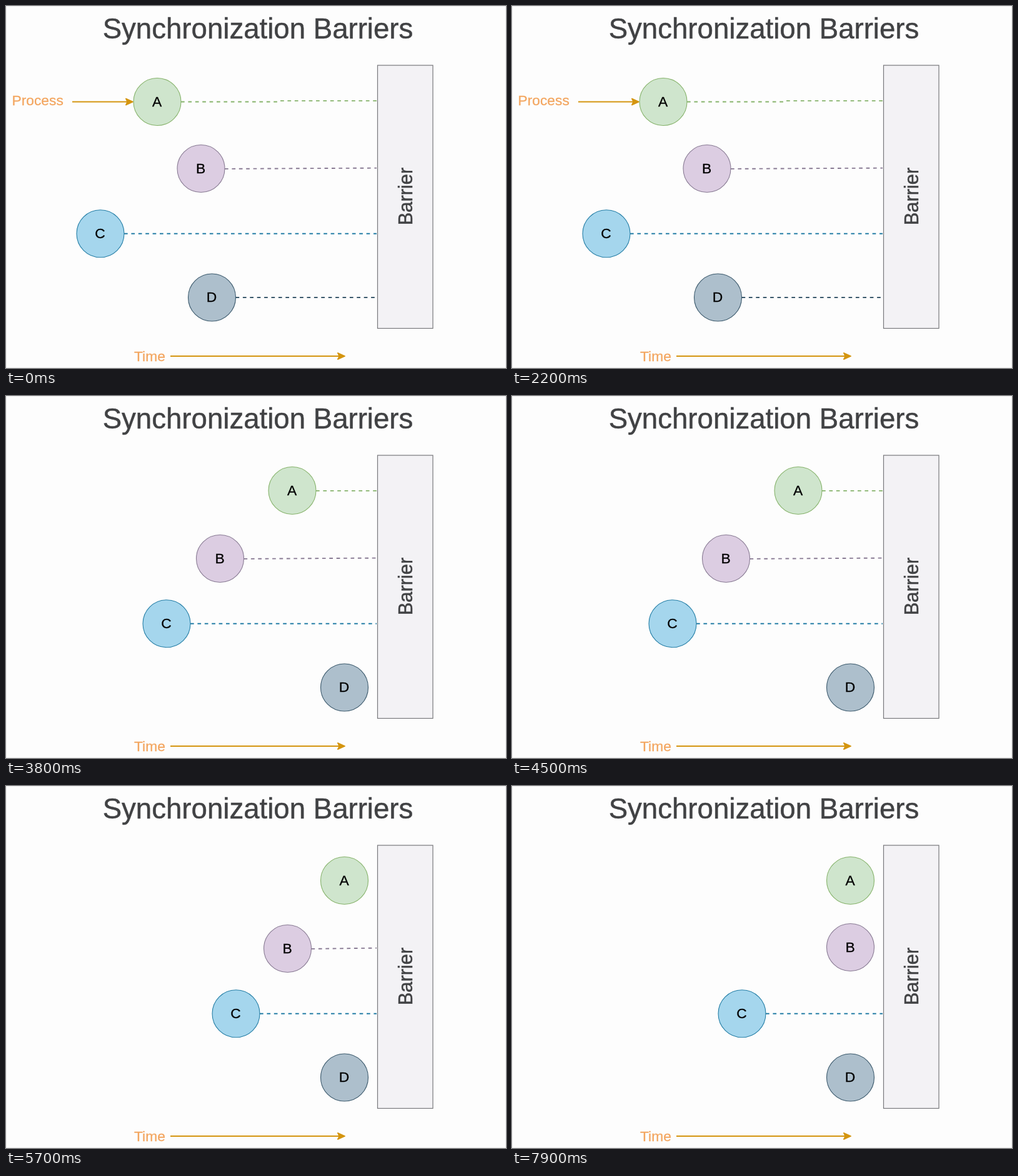
An HTML page for the animation above (8 s loop, 800 px wide and 580 px high).

```html
<!DOCTYPE html>
<html lang="en">
<head>
<meta charset="utf-8">
<title>Synchronization Barriers</title>
<style>
  html, body { margin: 0; width: 100%; height: 100%; overflow: hidden; background: #fdfdfd; }
  svg { display: block; width: 800px; height: 580px; font: 22.8px "Liberation Sans", Arial, sans-serif; }
  .mid { text-anchor: middle; }
  .dark { fill: #414244; stroke: #414244; stroke-width: .5; }
  .label { fill: #f3a660; stroke: #f3a660; stroke-width: .3; }
  .arrow { fill: #d4950f; stroke: #d4950f; stroke-width: 1.9; stroke-linejoin: round; }
  .dash { fill: none; stroke-width: 1.9; stroke-dasharray: 5.7; }
</style>
</head>
<body>
<svg viewBox="0 0 800 580">
  <rect x=".5" y=".5" width="799" height="579" fill="#fdfdfd" stroke="#efefef"/>
  <text class="mid dark" x="403" y="52" font-size="45.6">Synchronization Barriers</text>
  <g id="process">
    <text class="label" x="9.5" y="159">Process</text>
    <path class="arrow" d="M106 153.5H194M203 153.5l-11 -5l2.5 5l-2.5 5z"/>
  </g>
  <text class="label" x="205" y="569">Time</text>
  <path class="arrow" d="M263 561H534M542 561l-11 -5l2.5 5l-2.5 5z"/>
  <g id="nodes"></g>
  <rect x="594.5" y="95" width="88.5" height="421.5" fill="#f3f2f5" stroke="#77777b" stroke-width="1.2"/>
  <text class="mid dark" transform="translate(649.5 305) rotate(-90)" font-size="30.8">Barrier</text>
</svg>
<script>
const LOOP = 8000, R = 38, WALL = 593;
const STEPS = [0, 2300, 4600, 6900];

// x and y hold one position per step; at WAIT the node stands at the barrier
const WAIT = 541.5;
const nodes = [
  { name: 'A', fill: '#cfe5cd', line: '#86b36b', x: [242, 458, WAIT, WAIT], y: [153.5, 151.5, 151.5, 151.5] },
  { name: 'B', fill: '#dccde2', line: '#887a93', x: [312, 342.5, 450.5, WAIT], y: [260.5, 260.5, 260.5, 258.5] },
  { name: 'C', fill: '#a5d6ed', line: '#247ea6', x: [151, 257, 368, 368], y: [364.7, 364.7, 364.7, 364.7] },
  { name: 'D', fill: '#adbfcc', line: '#3a586b', x: [329.5, WAIT, WAIT, WAIT], y: [467, 467, 467, 467] }
];

// Dashed route from a node's right edge to the barrier
const routes = {
  A: (x, y) => `M${x} ${y}H434L436 151.9H${WALL}`,
  B: (x, y) => `M${x} ${y + .4}L${WALL} 259.6`,
  C: (x, y) => `M${x} ${y}H${WALL}`,
  D: (x, y) => `M${x} ${y}H590`
};

function drawNode({ name, fill, line, x, y }, step) {
  const cx = x[step], cy = y[step], start = cx + R;
  const path = name === 'A' && step ? `M${start} ${cy + .4}H${WALL}` : routes[name](start, cy);
  const route = cx === WAIT ? '' : `<path class="dash" stroke="${line}" d="${path}"/>`;
  return `${route}<circle cx="${cx}" cy="${cy}" r="${R}" fill="${fill}" stroke="${line}" stroke-width="1.1"/>
    <text class="mid" x="${cx - .5}" y="${cy + 7.2}" stroke="#000" stroke-width=".3">${name}</text>`;
}

const group = document.getElementById('nodes');
const process = document.getElementById('process');
let shown = -1;

function frame() {
  const t = performance.now() % LOOP;
  const step = STEPS.filter(s => s <= t).length - 1;
  if (step !== shown) {
    shown = step;
    process.style.display = step ? 'none' : '';
    group.innerHTML = nodes.map(n => drawNode(n, step)).join('');
  }
  requestAnimationFrame(frame);
}
frame();
</script>
</body>
</html>
```
